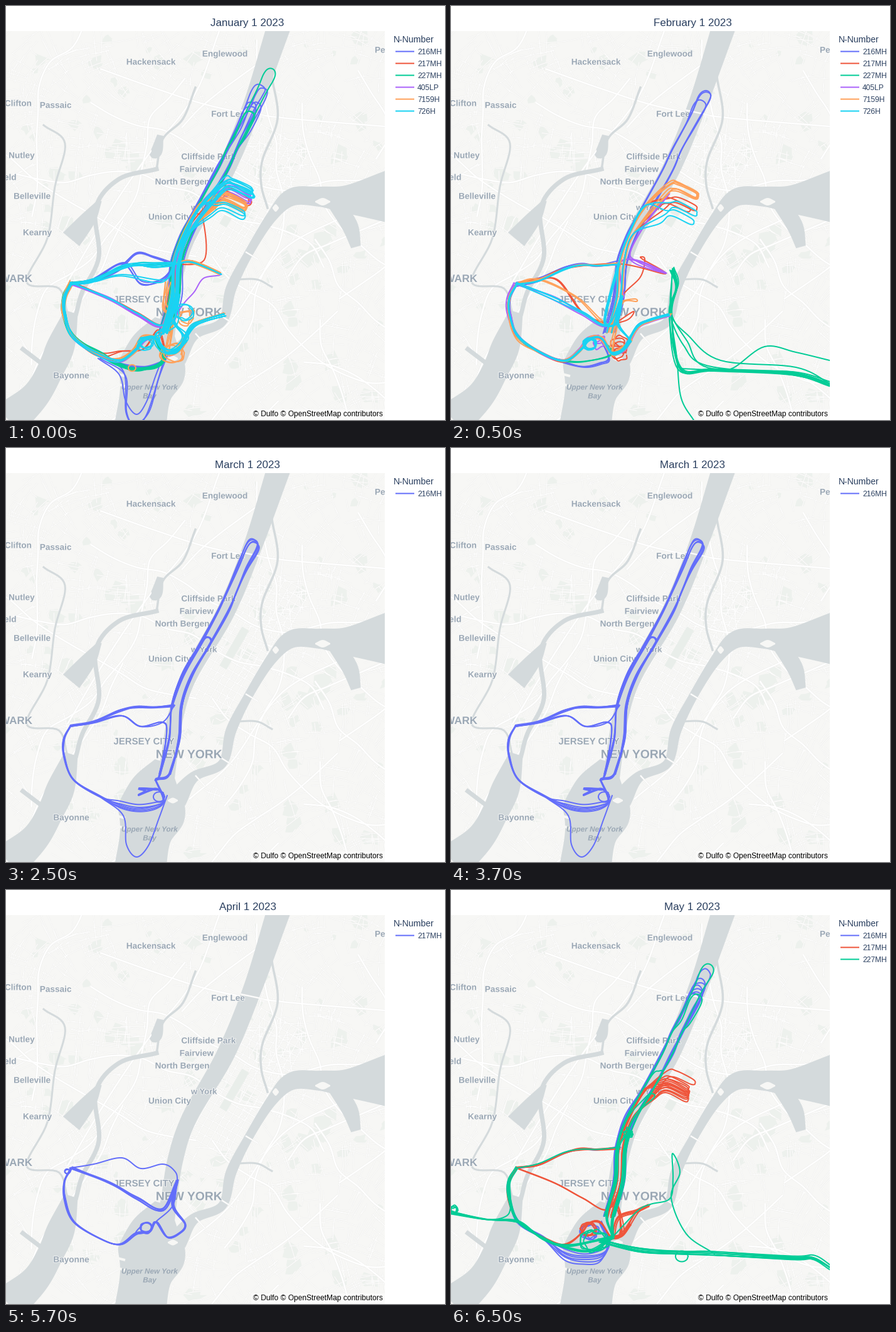
Animation, 700 px wide and 660 px high, one loop 8000 ms. Source, as a matplotlib script:

```python
import numpy as np
import matplotlib.pyplot as plt
from matplotlib.animation import FuncAnimation
from matplotlib.collections import LineCollection
from matplotlib.patches import Polygon, Rectangle
from matplotlib.patheffects import withStroke

W, H, PX, STEP = 700, 660, 0.72, 500
LAND, WATER, PARK, LABEL, INK = "#f7f7f5", "#d4dadc", "#edf1ed", "#9ba8b5", "#2a3f5f"
COLORS = ["#636efa", "#ef553b", "#00cc96", "#ab63fa", "#ffa15a", "#19d3f3"]
TAILS = ["216MH", "217MH", "227MH", "405LP", "7159H", "726H"]
MONTHS = [("January", TAILS), ("February", TAILS), ("March", TAILS[:1]),
          ("April", TAILS[1:2]), ("May", TAILS[:3])]
JAN, FEB, MAR, APR, MAY = range(5)
rng = np.random.default_rng(23)

plt.rcParams["font.family"] = "Liberation Sans"
fig = plt.figure(figsize=(W / 100, H / 100), dpi=100, facecolor="white")
page = fig.add_axes([0, 0, 1, 1], xlim=(0, W), ylim=(H, 0))
chart = fig.add_axes([0, 0, 604 / W, 620 / H], xlim=(0, 604), ylim=(H, 40))
page.axis("off")
chart.axis("off")


def spline(pts, steps=10):
    """Catmull-Rom curve through the points, in any dimension."""
    p = np.vstack([2 * pts[0] - pts[1], pts, 2 * pts[-1] - pts[-2]])
    a, b, c, d = (p[i:len(p) - 3 + i, None] for i in range(4))
    t = np.linspace(0, 1, steps, endpoint=False)[None, :, None]
    q = b + (c - a) * t / 2 + (a - 2.5 * b + 2 * c - d / 2) * t**2 \
        + (1.5 * (b - c) + (d - a) / 2) * t**3
    return np.vstack([q.reshape(-1, pts.shape[1]), pts[-1:]])


# ---- base map -------------------------------------------------------------
def strip(color, *stations, z=2):
    """Fill a band along stations given as (x, y, width)."""
    curve = spline(np.array(stations, float))
    center, half = curve[:, :2], curve[:, 2:] / 2
    step = np.gradient(center, axis=0)
    normal = np.c_[-step[:, 1], step[:, 0]] / np.hypot(*step.T)[:, None] * half
    edge = np.vstack([center + normal, (center - normal)[::-1]])
    chart.add_patch(Polygon(edge, fc=color, ec="none", zorder=z))


def stream(width, *pts):
    chart.plot(*spline(np.array(pts, float)).T, color=WATER, lw=width * PX, zorder=2)


def roads(lines, width, z=1):
    for extra, tone, dz in ((1.2, "#f0f0ee", 0), (0, "white", .1)):
        chart.add_collection(LineCollection(lines, colors=tone, zorder=z + dz,
                                            linewidths=(width + extra) * PX))


def label(text, x, y, size=13.6, ha="center", halo="#f9f9f8", **style):
    chart.text(x, y, text, ha=ha, va="center_baseline", fontsize=size * PX, color=LABEL,
               weight="bold", zorder=4, clip_on=True, **style,
               path_effects=[withStroke(linewidth=1.2, foreground=halo)])


def land_cover():
    chart.add_patch(Rectangle((0, 40), 604, 620, color=LAND, zorder=0))
    turn = np.linspace(0, 2 * np.pi, 9)
    for _ in range(110):
        center, r = rng.uniform((0, 40), (604, 660)), rng.uniform(4, 18)
        blob = np.c_[np.cos(turn), np.sin(turn)] * r * rng.uniform(.4, 1.2, (9, 1))
        chart.add_patch(Polygon(center + blob, fc=PARK, ec="none", zorder=.5))
    strip("#e9eeea", (346, 350, 13), (382, 288, 13), z=1.4)


def street_net():
    streets = []
    for _ in range(1600):
        x, y = rng.uniform((0, 40), (604, 660))
        heading = .9 * np.sin(x / 95) + .8 * np.cos(y / 80) + rng.integers(2) * np.pi / 2
        way = np.array([np.cos(heading), np.sin(heading)]) * rng.uniform(5, 32)
        streets.append([(x, y) - way, (x, y) + rng.normal(0, 1.6, 2), (x, y) + way])
    roads(streets, .8)

    corner, avenue, cross = np.array([(292, 392), (.49, -.87), (.87, .49)])
    grid = [[corner + cross * s, corner + cross * s + avenue * 235] for s in range(0, 93, 11)]
    grid += [[corner + avenue * s, corner + avenue * s + cross * 92] for s in range(0, 236, 13)]
    roads(grid, 1)

    highways = []
    for _ in range(24):
        heading = rng.uniform(0, 2 * np.pi) + np.cumsum(rng.normal(0, .25, 14))
        steps = 42 * np.c_[np.cos(heading), np.sin(heading)]
        highways.append(spline(rng.uniform((0, 40), (604, 660)) + np.cumsum(steps, axis=0)))
    for route in ([(98, 440), (165, 328), (225, 240), (300, 143), (340, 40)],
                  [(150, 100), (240, 132), (330, 160), (430, 177), (604, 192)],
                  [(292, 560), (360, 500), (440, 390), (550, 330)]):
        highways.append(spline(np.array(route, float)))
    roads(highways, 2.4, 1.5)


def waterways():
    strip(WATER, (436, 30, 38), (394, 155, 30), (350, 262, 29), (293, 362, 25),
          (270, 430, 25), (258, 505, 27), (250, 530, 40))
    strip(WATER, (250, 500, 26), (238, 540, 80), (232, 580, 108), (222, 620, 82), (214, 670, 82))
    strip(WATER, (272, 560, 34), (300, 524, 17), (345, 503, 14), (359, 450, 17),
          (386, 396, 14), (422, 338, 17), (455, 305, 28), (500, 304, 32), (545, 308, 46),
          (612, 304, 86))
    strip(WATER, (525, 315, 24), (548, 350, 26), (558, 384, 16))
    strip(WATER, (104, 488, 22), (88, 540, 44), (70, 582, 42), (46, 622, 46), (4, 660, 60))
    strip(WATER, (24, 545, 7), (66, 577, 7))
    strip(WATER, (104, 372, 34), (132, 338, 24), (150, 310, 6))
    strip(WATER, (231, 240, 7), (240, 232, 18), (246, 206, 10))
    stream(7, (112, 490), (122, 455), (148, 400), (143, 322), (180, 276), (240, 260))
    stream(3.5, (240, 260), (250, 212), (282, 180), (302, 130))
    stream(3, (98, 490), (84, 450), (33, 440), (66, 370), (78, 288), (94, 219), (60, 190))
    stream(3.5, (424, 113), (433, 180), (409, 245), (407, 285), (417, 322))
    stream(3, (366, 436), (400, 436), (424, 448))
    for x, y, length, width in ((266, 562, 16, 9), (505, 312, 24, 12), (430, 322, 10, 12)):
        strip(LAND, (x - length / 2, y, 2), (x, y, width), (x + length / 2, y, 2), z=2.5)
    for y in (576, 592):
        strip(LAND, (135, y, 4), (190, y + 14, 4), z=2.5)
    roads([[(374, 166), (412, 174)], [(302, 522), (318, 540)], [(343, 494), (362, 506)],
           [(382, 392), (402, 404)]], 1.5, 2.6)


def place_names():
    for name, x, y in (("Hackensack", 231, 88), ("Englewood", 349, 75), ("Passaic", 79, 157),
                       ("Fort Lee", 354, 171), ("Nutley", 25, 237), ("Cliffside Park", 323, 239),
                       ("Fairview", 304, 259), ("North Bergen", 281, 279),
                       ("Belleville", 42, 302), ("Union City", 261, 335), ("Kearny", 50, 360),
                       ("Bayonne", 104, 588)):
        label(name, x, y)
    label("Clifton", 41, 154, ha="right")
    label("Bloomfield", 17, 272, ha="right")
    label("Pelham", 588, 69, ha="left")
    label("w York", 295, 321, 13, ha="left")
    label("JERSEY CITY", 220, 467, 15)
    label("NEW YORK", 291.5, 488, 19.3)
    label("NEWARK", 42, 434, 17, ha="right")
    label("Upper New York", 229, 607, 11.7, style="italic", halo=WATER)
    label("Bay", 229, 621, 11.7, style="italic", halo=WATER)


# ---- flights --------------------------------------------------------------
PLACES = dict(
    pad=(104, 443), bend=(93, 465), bay=(93, 492), shore=(108, 529), kill=(150, 556),
    terminal=(182, 565), liberty=(207, 547), ellis=(220, 531), statue=(229, 544),
    slip=(239, 529), battery=(257, 554), pier=(276, 547), tip=(286, 533), bridge=(297, 512),
    navy=(318, 501), corlears=(349, 492), holland=(266, 503), chelsea=(273, 463),
    lincoln=(268, 411), weehawken=(235, 414), heights=(208, 413), secaucus=(180, 419),
    marsh=(140, 437), journal=(165, 467), hamilton=(210, 491), newport=(250, 509),
    croxton=(185, 427), hoboken=(215, 444), castle=(250, 437), herald=(296, 408),
    midtown=(342, 427), kips=(353, 420), hunters=(361, 447), greenpoint=(351, 490),
    prospect=(366, 578), brownsville=(420, 580), jamaica=(545, 587), kennedy=(608, 604),
    airport=(-4, 514), ironbound=(55, 525))
ARC = "pad bend bay shore kill"
HOOK = "terminal liberty ellis slip battery pier tip"
WEST = "lincoln weehawken heights secaucus marsh pad"
DIAGONAL = "pad journal hamilton newport chelsea"
DIP = "pad marsh croxton hoboken castle"
EAST = "battery pier bridge navy corlears navy bridge pier battery"
CROSS = "lincoln herald midtown herald lincoln"
RIVER = [(253, 520), (268, 465), (272, 410), (288, 363), (314, 318), (345, 262)]
tracks = {}


def fly(month, tail, copies, spread, *legs):
    """Fly a route of place names and points several times, each a little off."""
    pts = []
    for leg in legs:
        pts += [PLACES[name] for name in leg.split()] if isinstance(leg, str) else list(leg)
    base = np.array(pts, float)
    for _ in range(copies):
        drift = rng.normal(0, spread * .6, 2) + rng.normal(0, spread * .55, base.shape)
        tracks.setdefault((month, tail), []).append(spline(base + drift))


def lane(offset, top):
    """The lowest points of the river line, moved sideways."""
    return [(x + offset, y) for x, y in RIVER[:top]]


def hudson(month, tail, spread, *apexes):
    for x, y in apexes:
        cap = [(x + dx, y + dy) for dx, dy in
               ((-26, 40), (-13, 9), (-4, 0), (5, 4), (4, 16), (-13, 46))]
        fly(month, tail, 1, spread, lane(-8, 6), [(352, 228)], cap, [(368, 228)], lane(8, 6)[::-1])


def park(month, tail, spread, x, *rows):
    """Hops across midtown that turn at (x, row)."""
    for y in rows:
        turn = [(x + dx, y + dy) for dx, dy in
                ((-44, -18), (-30, -19), (-4, -6), (0, 0), (-6, 3), (-36, -10), (-54, 2))]
        fly(month, tail, 1, spread, lane(-4, 5), turn, lane(3, 4)[::-1])


def ring(month, tail, copies, spread, x, y, r):
    a = np.linspace(0, 2 * np.pi, 11)
    fly(month, tail, copies, spread, np.c_[x + r * np.cos(a), y + r * .85 * np.sin(a)])


def south(month, tail, copies, spread, depth):
    fly(month, tail, copies, spread, ARC,
        [(182, depth - 6), (212, depth), (240, depth - 5), (252, 561)], "slip")


def harbour(month, tail, copies, spread, depth):
    fly(month, tail, copies, spread, "kill",
        [(187, 586), (192, depth - 20), (208, depth), (227, depth - 18), (244, 590)], "battery")


def january():
    hudson(JAN, "216MH", 2, (406, 127), (410, 132), (394, 152), (398, 156), (392, 160))
    fly(JAN, "216MH", 3, 3, "lincoln", [(235, 400), (208, 394)], "secaucus marsh pad")
    fly(JAN, "216MH", 3, 2.5, "marsh", [(187, 412)], "hoboken castle lincoln")
    south(JAN, "216MH", 3, 1.5, 577)
    for depth in (650, 662, 668):
        harbour(JAN, "216MH", 1, 3, depth)
    fly(JAN, "217MH", 1, 0, [(300, 330), (314, 340), (316, 405)], CROSS)
    fly(JAN, "217MH", 2, 2, ARC, [(185, 550), (218, 546), (243, 518)], "battery")
    fly(JAN, "217MH", 2, 2, DIAGONAL)
    park(JAN, "217MH", 3, 388, 308, 314)
    hudson(JAN, "227MH", 1, (423, 100), (391, 167), (390, 168))
    fly(JAN, "227MH", 3, 2.5, WEST)
    south(JAN, "227MH", 9, 2, 580)
    fly(JAN, "405LP", 1, 0, "holland", [(283, 475), (300, 456), (315, 434)], "midtown herald lincoln")
    fly(JAN, "405LP", 3, 2, DIAGONAL)
    fly(JAN, "405LP", 2, 2, ARC, HOOK)
    park(JAN, "405LP", 2, 391, 304, 307, 311)
    park(JAN, "7159H", 1.5, 384, *range(317, 327, 2))
    fly(JAN, "7159H", 2, 2, CROSS)
    fly(JAN, "7159H", 4, 2.5, ARC, HOOK)
    ring(JAN, "7159H", 1, 0, 201, 577, 6)
    ring(JAN, "7159H", 3, 3, 265, 553, 17)
    ring(JAN, "7159H", 2, 3, 286, 495, 12)
    fly(JAN, "7159H", 4, 3, [(258, 440), (253, 480)], "holland battery")
    fly(JAN, "7159H", 2, 2, EAST)
    park(JAN, "726H", 2, 393, *range(294, 305, 2))
    park(JAN, "726H", 1.5, 380, 332, 335)
    fly(JAN, "726H", 6, 2.5, WEST)
    fly(JAN, "726H", 4, 1.5, ARC, HOOK)
    fly(JAN, "726H", 2, 2, DIAGONAL)
    fly(JAN, "726H", 2, 3, "marsh croxton castle lincoln")
    fly(JAN, "726H", 1, 1, CROSS)
    fly(JAN, "726H", 3, 2, EAST)
    fly(JAN, "726H", 5, 5, "chelsea holland slip battery tip holland")
    ring(JAN, "726H", 2, 2, 286, 488, 14)
    ring(JAN, "726H", 3, 2, 223, 538, 11)


def february():
    hudson(FEB, "216MH", 1.2, (407, 135), (408, 136), (400, 148))
    fly(FEB, "216MH", 3, 2, WEST)
    south(FEB, "216MH", 3, 1.5, 574)
    park(FEB, "217MH", 1, 392, 324)
    park(FEB, "217MH", 1, 381, 325)
    fly(FEB, "217MH", 1, 0, "pad marsh secaucus lincoln midtown", [(306, 404), (303, 400), (309, 404),
        (302, 432)], "chelsea holland")
    fly(FEB, "217MH", 1, 0, "newport", [(282, 500), (291, 487)], "holland")
    fly(FEB, "217MH", 2, 2, "pad marsh", [(172, 440)], "hamilton newport")
    fly(FEB, "217MH", 2, 1.5, ARC, HOOK)
    for y in range(536, 560, 5):
        ring(FEB, "217MH", 1, 2, 268, y, 11)
    fly(FEB, "227MH", 5, 2, "kips hunters greenpoint prospect brownsville jamaica kennedy")
    for low in (574, 580):
        fly(FEB, "227MH", 1, 2, "kips hunters greenpoint", [(375, 540), (410, low)], "jamaica kennedy")
    fly(FEB, "227MH", 1, 0, "kips greenpoint", [(378, 525), (430, 565), (550, 576)], "kennedy")
    fly(FEB, "227MH", 1, 0, "prospect brownsville", [(450, 577), (500, 543), (550, 552), (608, 566)])
    fly(FEB, "227MH", 1, 0, "kips greenpoint", [(360, 560), (367, 625), (390, 665)])
    fly(FEB, "227MH", 2, 1, ARC, "terminal", [(215, 566)], "battery slip")
    fly(FEB, "405LP", 2, 2, [(345, 300), (310, 345), (286, 392)], "herald midtown herald lincoln chelsea")
    fly(FEB, "405LP", 3, 2.5, DIAGONAL)
    fly(FEB, "405LP", 4, 2, ARC, HOOK)
    ring(FEB, "405LP", 2, 2, 236, 535, 8)
    fly(FEB, "405LP", 2, 2.5, EAST)
    park(FEB, "7159H", 1.3, 393, 300, 301, 303, 304)
    fly(FEB, "7159H", 3, 1.5, WEST)
    fly(FEB, "7159H", 2, 2, "pad marsh", [(200, 465)], "newport chelsea")
    fly(FEB, "7159H", 1, 0, "holland", [(268, 474), (292, 467), (296, 471), (275, 472)], "holland")
    fly(FEB, "7159H", 3, 2, ARC, HOOK)
    fly(FEB, "7159H", 3, 1.5, EAST)
    fly(FEB, "7159H", 3, 2.5, "holland battery pier tip battery")
    park(FEB, "726H", 1, 393, 331)
    park(FEB, "726H", 1, 387, 344)
    fly(FEB, "726H", 3, 1.5, WEST)
    fly(FEB, "726H", 4, 1.3, ARC, HOOK)
    fly(FEB, "726H", 3, 2, DIAGONAL)
    fly(FEB, "726H", 4, 1.5, "lincoln", [(247, 490)], "newport holland chelsea holland tip")
    fly(FEB, "726H", 3, 1.5, EAST)
    ring(FEB, "726H", 4, 1.2, 222, 539, 10)


def march():
    hudson(MAR, "216MH", 1.2, (395, 148), (396, 148), (397, 149), (395, 147))
    fly(MAR, "216MH", 3, 1.5, "slip", lane(8, 5), [(327, 306), (318, 302)], lane(-6, 5)[:1:-1])
    fly(MAR, "216MH", 4, 1, WEST)
    for depth in (574, 576, 578, 580, 570):
        south(MAR, "216MH", 1, 1, depth)
    fly(MAR, "216MH", 1, 0, DIP, "lincoln")
    fly(MAR, "216MH", 2, 1, DIP, [(257, 455), (246, 520)], "slip")
    harbour(MAR, "216MH", 1, 0, 652)
    ring(MAR, "216MH", 1, 0, 244, 556, 9)
    fly(MAR, "216MH", 4, 1, [(250, 550), (237, 544), (211, 553), (222, 547), (212, 543), (240, 544)])


def april():
    fly(APR, "217MH", 1, 0, DIP, [(268, 447)], "chelsea holland tip")
    fly(APR, "217MH", 4, 1, ARC, "terminal liberty statue slip battery pier tip holland chelsea")
    fly(APR, "217MH", 5, 1.5, DIAGONAL)
    fly(APR, "217MH", 1, 0, "chelsea holland slip statue liberty ellis")
    ring(APR, "217MH", 3, .8, 223, 538, 9)
    ring(APR, "217MH", 2, .6, 98, 449, 4)


def may():
    hudson(MAY, "216MH", 1.5, (409, 127), *[(401 - 2 * i, 142 + 5 * i) for i in range(6)])
    fly(MAY, "216MH", 3, 1.5, WEST)
    for depth in range(580, 597, 3):
        south(MAY, "216MH", 1, 1.5, depth)
    ring(MAY, "216MH", 3, 3, 222, 548, 13)
    park(MAY, "217MH", 1, 389, 307)
    park(MAY, "217MH", 1.5, 379, *range(316, 335, 3))
    fly(MAY, "217MH", 4, 1.5, WEST)
    fly(MAY, "217MH", 2, 1, DIAGONAL)
    fly(MAY, "217MH", 4, 1.5, ARC, HOOK)
    fly(MAY, "217MH", 4, 2, "battery", [(268, 522)], "bridge navy bridge pier battery")
    fly(MAY, "217MH", 4, 3, "newport holland pier battery")
    ring(MAY, "217MH", 3, 2, 219, 541, 12)
    hudson(MAY, "227MH", .6, (412, 118), (394, 167))
    for x, y in ((330, 290), (318, 324)):
        fly(MAY, "227MH", 1, 1, lane(-6, 4), [(x - 12, y + 10), (x, y), (x + 6, y + 7)], lane(4, 4)[::-1])
    ring(MAY, "227MH", 2, 2, 283, 388, 6)
    for shift in (-5, 6):
        fly(MAY, "227MH", 4, 1.5, "battery", lane(shift, 3), [(284, 386)])
    fly(MAY, "227MH", 1, 1, WEST)
    fly(MAY, "227MH", 4, 1.3, ARC, [(190, 572), (225, 575)], "battery")
    fly(MAY, "227MH", 7, 2, [(236, 558), (300, 574)], "prospect brownsville jamaica",
        [(580, 587)], "kennedy")
    ring(MAY, "227MH", 1, 0, 368, 584, 10)
    fly(MAY, "227MH", 1, 0, "brownsville", [(375, 548)], "greenpoint", [(365, 450)], "kips", [(354, 460)],
        "corlears navy bridge battery")
    fly(MAY, "227MH", 4, 2.5, "airport ironbound shore kill", [(190, 566)], "battery")
    fly(MAY, "227MH", 1, 0, "airport ironbound", [(86, 521), (95, 505)], "bend")
    ring(MAY, "227MH", 3, 1.5, 5, 509, 5)
    ring(MAY, "227MH", 3, 4, 227, 559, 20)


for draw in (land_cover, street_net, waterways, place_names, january, february, march, april, may):
    draw()

layers = [[] for _ in MONTHS]
for (month, tail), lines in tracks.items():
    rank = MONTHS[month][1].index(tail)
    bundle = LineCollection(lines, colors=COLORS[rank], linewidths=2 * PX,
                            capstyle="round", joinstyle="round", zorder=5 + rank)
    layers[month].append(chart.add_collection(bundle))

# ---- title, legend and credit ---------------------------------------------
chart.add_patch(Rectangle((391, 643), 213, 17, fc="white", alpha=.5, lw=0, zorder=20))
chart.text(601, 654, "© Dulfo © OpenStreetMap contributors", ha="right", fontsize=12 * PX,
           color="black", zorder=21)
title = page.text(385, 32, "", ha="center", fontsize=17 * PX, color=INK)
page.text(618, 58, "N-Number", fontsize=14 * PX, color=INK)
for month, (_, tails) in enumerate(MONTHS):
    for i, tail in enumerate(tails):
        y = 72.5 + 19 * i
        layers[month] += page.plot([621, 651], [y, y], color=COLORS[i], lw=2 * PX,
                                   solid_capstyle="butt", snap=False)
        layers[month].append(page.text(656, y + 4.5, tail, fontsize=12 * PX, color=INK))


def update(frame):
    current = (frame + 3) // 4
    title.set_text(f"{MONTHS[current][0]} 1 2023")
    for month, artists in enumerate(layers):
        for artist in artists:
            artist.set_visible(month == current)
    return []


update(0)
animation = FuncAnimation(fig, update, frames=16, interval=STEP, repeat=True, repeat_delay=0)
plt.show()
```
